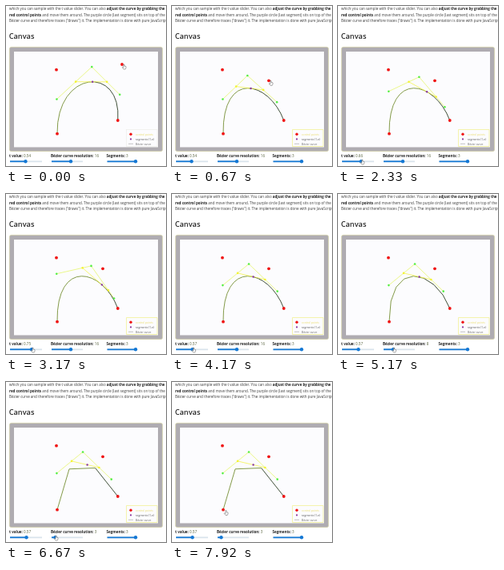
Write an HTML page with a canvas that moves like this. It is 200 px wide and 200 px high and loops after 8000 ms.

```html
<!DOCTYPE html>
<html lang="en">
<head>
<meta charset="utf-8">
<title>Bézier curve</title>
<style>
html, body { margin: 0; width: 100%; height: 100%; overflow: hidden; background: #fff; }
canvas { display: block; width: 100vw; height: 100vh; }
</style>
</head>
<body>
<canvas></canvas>
<script>
const LOOP = 8000, STEP = 1000 / 12;
const canvas = document.querySelector('canvas');
const ctx = canvas.getContext('2d');
const RED = '#f01414', GREEN = '#55ef45', YELLOW = '#f4f436', PURPLE = '#8b3aa0', BLUE = '#1478d4';

const lerp = (a, b, t) => a + (b - a) * t;
const mix = (p, q, t) => p.map((v, i) => lerp(v, q[i], t));

// Keys are [time, value...]; moves between them are eased.
function track(keys, time) {
  let i = 0;
  while (i < keys.length - 2 && time > keys[i + 1][0]) i++;
  const [from, ...a] = keys[i], [to, ...b] = keys[i + 1];
  const u = Math.min(1, Math.max(0, (time - from) / (to - from)));
  return mix(a, b, u * u * (3 - 2 * u));
}

const handleKeys = [[0, 145, 73], [650, 121, 93.3]];
const valueKeys = [[1420, .54], [2250, .66], [3170, .75], [3950, .57]];
const resolutionKeys = [[4600, 16], [5170, 8], [6300, 3]];
const toSliderKeys = [[700, 123, 95.3], [1330, 25, 194]];
const toResolutionKeys = [[4170, 27, 194], [4600, 81.5, 194]];
const toCurveKeys = [[6750, 62, 194], [7800, 67, 162.5]];

const thumbT = t => 5 + 36 * t;
const thumbResolution = n => 57 + 1.5 * n;

function dot([x, y], r, color) {
  ctx.fillStyle = color;
  ctx.beginPath();
  ctx.arc(x, y, r, 0, 7);
  ctx.fill();
}

function path(points, color, width) {
  ctx.strokeStyle = color;
  ctx.lineWidth = width;
  ctx.lineJoin = 'round';
  ctx.beginPath();
  points.forEach(p => ctx.lineTo(...p));
  ctx.stroke();
}

// Draws text and returns the x position after it.
function text(str, x, y, size, color = '#3a3a3a', weight = 400) {
  ctx.font = `${weight} ${size}px "Open Sans", "Noto Sans", sans-serif`;
  ctx.fillStyle = color;
  ctx.fillText(str, x, y);
  return x + ctx.measureText(str).width;
}

function slider(label, value, x, thumb, end) {
  const after = text(label + ' ', x, 189.3, 4.55, '#222', 700);
  text(value, after, 189.3, 4.55, '#55603a');
  path([[x + 1, 194.3], [end, 194.3]], '#d9e4ec', 1.8);
  path([[x + 1, 194.3], [thumb, 194.3]], BLUE, 1.8);
  dot([thumb, 194.3], 2.2, BLUE);
}

function page() {
  const size = 4.5;
  ctx.fillStyle = '#fff';
  ctx.fillRect(0, 0, 200, 200);
  let x = text('which you can sample with the t value slider. You can also ', 4, 5.3, size);
  text('adjust the curve by grabbing the', x, 5.3, size, '#222', 700);
  x = text('red control points', 4, 12.8, size, '#222', 700);
  text(' and move them around. The purple circle (last segment) sits on top of the', x, 12.8, size);
  text('Bézier curve and therefore traces ("draws") it. The implementation is done with pure JavaScript', 4, 20, size);
  text('Canvas', 3.7, 41, 9.2, '#292929', 600);
  ctx.fillStyle = '#afacb1';
  ctx.strokeStyle = '#dedca4';
  ctx.lineWidth = .6;
  ctx.beginPath();
  ctx.roundRect(4.3, 51.3, 191.4, 130.4, 2.5);
  ctx.fill();
  ctx.stroke();
  ctx.fillStyle = '#fcfcfe';
  ctx.fillRect(10, 57, 180, 119.5);
}

function legend(highlight) {
  ctx.strokeStyle = highlight ? '#f3f08a' : '#eeeeea';
  ctx.lineWidth = .7;
  ctx.strokeRect(150.5, 154.5, 38.5, 21);
  dot([156, 160.3], 1.7, RED);
  dot([156, 166.4], 1.1, PURPLE);
  path([[153, 172.3], [159, 172.3]], '#888', .5);
  text('control points', 162, 161.5, 3.4, '#e9dc6a');
  text('segments (1-n)', 162, 167.6, 3.4, '#555');
  text('Bézier curve', 162, 173.5, 3.4, '#666');
}

function curve(points, t, resolution) {
  const at = u => {
    let level = points;
    while (level.length > 1) level = level.slice(1).map((p, i) => mix(level[i], p, u));
    return level[0];
  };
  const samples = Array.from({ length: resolution + 1 }, (_, i) => at(i / resolution));
  const split = Math.round(t * resolution);
  path(samples.slice(split), '#2a3c22', .9);
  path(samples.slice(0, split + 1), '#758f34', .9);

  const first = points.slice(1).map((p, i) => mix(points[i], p, t));
  const second = first.slice(1).map((p, i) => mix(first[i], p, t));
  path(first, '#e2f55a', .7);
  path(second, YELLOW, .7);
  points.forEach(p => dot(p, 1.9, RED));
  first.forEach(p => dot(p, 1.3, GREEN));
  second.forEach(p => dot(p, 1.3, YELLOW));
  dot(at(t), 1.2, PURPLE);
}

function hand([x, y]) {
  ctx.fillStyle = '#fff';
  ctx.strokeStyle = '#444';
  ctx.lineWidth = .45;
  ctx.beginPath();
  [[0, -2], [.9, -2], [1, 0], [3, .6], [3, 2.4], [2.2, 4], [0, 4], [-1.8, 1.8], [-1.2, 1.2], [0, 2]]
    .forEach(([dx, dy]) => ctx.lineTo(x + dx, y + dy));
  ctx.closePath();
  ctx.fill();
  ctx.stroke();
}

function pointer(time, handle, t, resolution) {
  if (time < 700) return [handle[0] + 2, handle[1] + 2];
  if (time < 1420) return track(toSliderKeys, time);
  if (time < 4170) return [thumbT(t) + 1, 194];
  if (time < 4600) return track(toResolutionKeys, time);
  if (time < 6750) return [thumbResolution(resolution) + .5, 194];
  return track(toCurveKeys, time);
}

function draw(now) {
  const time = Math.floor((now % LOOP) / STEP + .05) * STEP;
  const ratio = devicePixelRatio || 1;
  const width = Math.round(innerWidth * ratio), height = Math.round(innerHeight * ratio);
  if (canvas.width !== width || canvas.height !== height) {
    canvas.width = width;
    canvas.height = height;
  }
  ctx.setTransform(width / 200, 0, 0, height / 200, 0, 0);

  const handle = track(handleKeys, time);
  const [t] = track(valueKeys, time);
  const resolution = Math.round(track(resolutionKeys, time)[0]);

  page();
  legend(time > 0);
  curve([[64, 159.7], [63, 79.7], handle, [139.8, 143]], t, resolution);
  slider('t value:', t.toFixed(2), 4, thumbT(t), 45);
  slider('Bézier curve resolution:', String(resolution), 56, thumbResolution(resolution), 96);
  slider('Segments:', '3', 125.5, 162, 163);
  hand(pointer(time, handle, t, resolution));
  requestAnimationFrame(draw);
}
requestAnimationFrame(draw);
</script>
</body>
</html>
```
